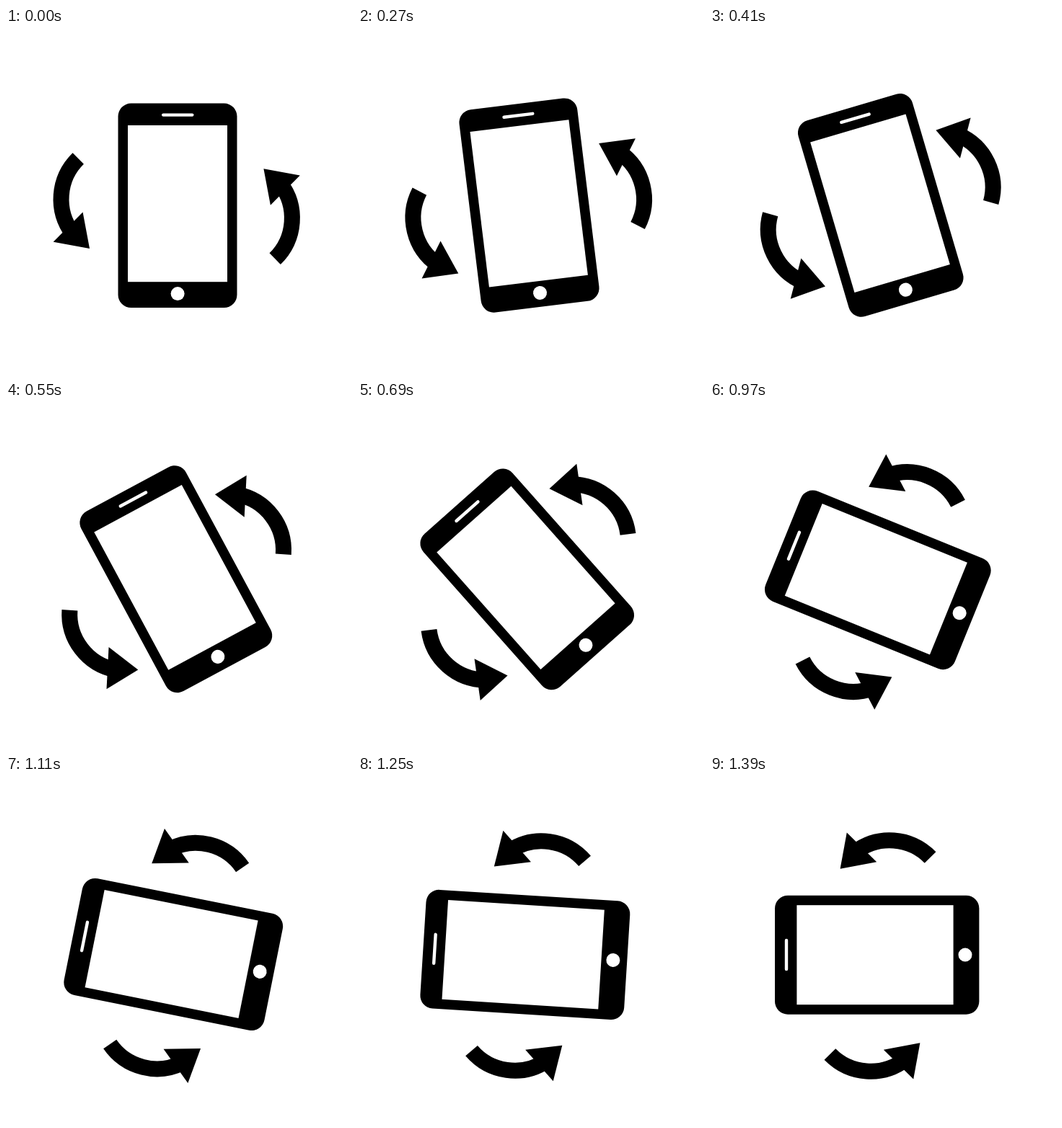
An HTML page without scripts that plays this animation: 480 by 480 pixels, repeating every 1520 ms.

```html
<!DOCTYPE html>
<html lang="en">
<head>
<meta charset="utf-8">
<title>Rotate your phone</title>
<style>
  @property --t { syntax: "<number>"; inherits: true; initial-value: 0; }

  html, body { margin: 0; width: 100%; height: 100%; overflow: hidden; background: #fff; }

  /* --t runs from 0 to 1 in 20 poses, with a longer hold on the first and last */
  svg {
    display: block; width: 100vw; height: 100vh;
    animation: advance 1520ms steps(20, jump-none) infinite;
  }
  @keyframes advance {
    0%, 3.94% { --t: 0; }
    96.05%, 100% { --t: 1; }
  }

  .phone, .arrows { transform-origin: 0 0; transform: rotate(calc(-90deg * var(--eased))); }

  /* Slow start and slow end */
  .phone { --eased: calc(var(--t) * (.12 + var(--t) * (2.64 - 1.76 * var(--t)))); }

  /* Full speed at first, then slowing down */
  .arrows { --eased: calc(var(--t) * (1.28 - var(--t) * var(--t) * (.11 + .17 * var(--t)))); }

  .screen { fill: #fff; }
  .shaft { fill: none; stroke: #000; stroke-width: 22; }
</style>
</head>
<body>
<svg viewBox="0 0 480 480">
  <defs>
    <g id="arrow">
      <path class="shaft" d="M-135.6 -69.4A79 79 0 0 0 -143.3 34.7"/>
      <path d="M-170.2 46.4L-129.3 5L-119.8 55.6Z"/>
    </g>
  </defs>

  <!-- Everything turns about this group's origin -->
  <g transform="translate(235.8 250.4)">
    <g class="phone">
      <rect x="-80.3" y="-145.8" width="165" height="283.4" rx="18"/>
      <g class="screen">
        <rect x="-66.8" y="-115.4" width="138" height="217.2"/>
        <rect x="-19.8" y="-132" width="44.5" height="4.4" rx="2.2"/>
        <circle cx="2.3" cy="118.2" r="9.5"/>
      </g>
    </g>
    <g class="arrows">
      <use href="#arrow"/>
      <use href="#arrow" transform="rotate(180 .9 .2)"/>
    </g>
  </g>
</svg>
</body>
</html>
```
